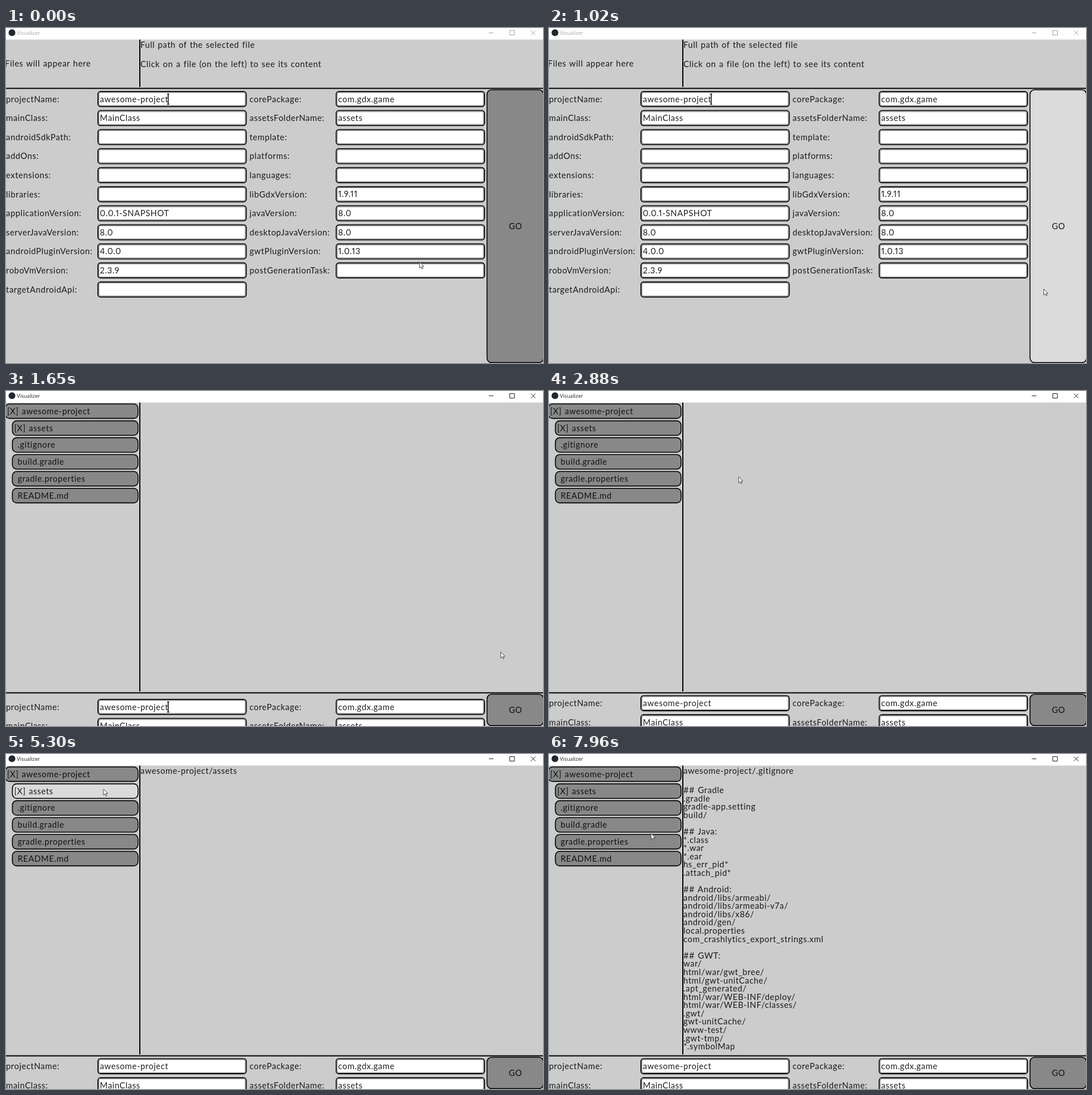
Write an HTML page that moves like this. It is 947x591 px and loops after 8 s.

```html
<!DOCTYPE html>
<html lang="en">
<head>
<meta charset="utf-8">
<title>Visualizer</title>
<style>
  html, body { margin: 0; width: 100%; height: 100%; overflow: hidden; background: #ccc; }
  svg { display: block; width: 947px; height: 591px; }
  text { font: 14.7px Lato, sans-serif; font-variant-numeric: proportional-nums; letter-spacing: .62px; word-spacing: 1px; fill: #000; fill-opacity: .88; white-space: pre; }
  #caption { font: 9.2px "Open Sans", sans-serif; letter-spacing: 0; word-spacing: 0; }
  .button { stroke: #000; stroke-width: 1.6; }
  .rule { stroke: #000; stroke-width: 2; }
</style>
</head>
<body>
<svg id="stage" viewBox="0 0 947 591"></svg>
<script>
const LOOP = 8000;
const ROW = 33.6;
const COLORS = { idle: '#888', over: '#dbdbdb', down: '#383838' };

const FIELDS = [
  ['projectName', 'awesome-project', 'corePackage', 'com.gdx.game'],
  ['mainClass', 'MainClass', 'assetsFolderName', 'assets'],
  ['androidSdkPath', '', 'template', ''],
  ['addOns', '', 'platforms', ''],
  ['extensions', '', 'languages', ''],
  ['libraries', '', 'libGdxVersion', '1.9.11'],
  ['applicationVersion', '0.0.1-SNAPSHOT', 'javaVersion', '8.0'],
  ['serverJavaVersion', '8.0', 'desktopJavaVersion', '8.0'],
  ['androidPluginVersion', '4.0.0', 'gwtPluginVersion', '1.0.13'],
  ['roboVmVersion', '2.3.9', 'postGenerationTask', ''],
  ['targetAndroidApi', '']
];

const TREE = ['[X] awesome-project', '[X] assets', '.gitignore', 'build.gradle', 'gradle.properties', 'README.md'];

const IGNORED = `## Gradle
.gradle
gradle-app.setting
build/

## Java:
*.class
*.war
*.ear
hs_err_pid*
.attach_pid*

## Android:
android/libs/armeabi/
android/libs/armeabi-v7a/
android/libs/x86/
android/gen/
local.properties
com_crashlytics_export_strings.xml

## GWT:
war/
html/war/gwt_bree/
html/gwt-unitCache/
.apt_generated/
html/war/WEB-INF/deploy/
html/war/WEB-INF/classes/
.gwt/
gwt-unitCache/
www-test/
.gwt-tmp/
*.symbolMap`.split('\n');

// pointer moves: first step, last step, number of steps, destination
const START = [729.5, 413];
const MOVES = [
  [80, 790, 10, 872.5, 460.5],
  [1980, 2650, 10, 438, 167],
  [2880, 2880, 1, 334.5, 151.5],
  [2960, 3350, 6, 171, 62],
  [3820, 3910, 2, 170, 48],
  [4670, 4840, 3, 172, 62],
  [5770, 6390, 8, 175, 88],
  [7080, 7570, 7, 180, 140]
];

// clicks: press, full highlight, release
const CLICKS = [
  [1340, 1430, 1650],
  [4140, 4200, 4370],
  [5070, 5160, 5300],
  [6460, 6540, 6770],
  [7720, 7800, 7960]
];

const PATHS = [
  [4370, 'awesome-project'],
  [5300, 'awesome-project/assets'],
  [6770, 'awesome-project/.gitignore']
];

const stage = document.getElementById('stage');

function add(parent, tag, attrs = {}, text) {
  const node = document.createElementNS('http://www.w3.org/2000/svg', tag);
  set(node, attrs);
  if (text !== undefined) node.textContent = text;
  parent.appendChild(node);
  return node;
}

function set(node, attrs) {
  for (const key in attrs) node.setAttribute(key, attrs[key]);
}

const group = (parent = stage) => add(parent, 'g');
const label = (parent, x, y, text) => add(parent, 'text', { x, y }, text);
const show = (node, on) => node.setAttribute('visibility', on ? 'visible' : 'hidden');

function field(parent, x, mid, text) {
  add(parent, 'rect', { x: x + .9, y: mid - 13.2, width: 261.4, height: 26.4, rx: 4.5, fill: '#fff', stroke: '#000', 'stroke-width': 1.8 });
  add(parent, 'rect', { x: x + 2.6, y: mid - 11.5, width: 258, height: 23, rx: 2.5, fill: 'none', stroke: '#999', 'stroke-width': 1.6 });
  label(parent, x + 4.3, mid + 5.2, text);
}

// form
const form = group();
FIELDS.forEach(([left, leftValue, right, rightValue], i) => {
  const mid = i * ROW;
  label(form, 0, mid + 5.4, left + ':');
  field(form, 161.3, mid, leftValue);
  if (!right) return;
  label(form, 429.5, mid + 5.4, right + ':');
  field(form, 581.5, mid, rightValue);
});
const caret = add(form, 'path', { d: 'M286 -9V9.5M284.3 -8.8H287.7M284.3 9.3H287.7', stroke: '#000', 'stroke-width': 1.5 });

const go = { x: 848.3, w: 99.5, node: add(stage, 'rect', { class: 'button', x: 848.3, width: 99.5, rx: 8 }) };
const goText = add(stage, 'text', { x: 898.5, 'text-anchor': 'middle' }, 'GO');

// panels
const vertical = add(stage, 'line', { class: 'rule', x1: 236, x2: 236, y1: 20 });
const horizontal = add(stage, 'line', { class: 'rule', x1: 0, x2: 947 });

const hints = group();
label(hints, -2, 68, 'Files will appear here');
label(hints, 237, 35.2, 'Full path of the selected file');
label(hints, 237, 69.2, 'Click on a file (on the left) to see its content');

const tree = group();
const items = TREE.map((text, i) => {
  const x = i ? 11.3 : -1.2;
  const y = 22.8 + i * 29.8;
  const w = 232.8 - x;
  const node = add(tree, 'rect', { class: 'button', x, y, width: w, height: 25.6, rx: 7.5 });
  label(tree, i === 0 ? 2 : i === 1 ? 14.5 : 20.5, y + 18, text);
  return { x, y, w, h: 25.6, node };
});

const path = label(stage, 237, 35.2, '');
const content = group();
IGNORED.forEach((line, i) => label(content, 237, 69.2 + i * 14.58, line));

// title bar
add(stage, 'rect', { width: 947, height: 20.4, fill: '#fff' });
add(stage, 'circle', { cx: 10.5, cy: 8.3, r: 6, fill: '#23272e' });
const caption = add(stage, 'text', { id: 'caption', x: 19.3, y: 11.8 }, 'Visualizer');
const controls = add(stage, 'path', { d: 'M851.5 8.5H859.5M888.5 4.5H896.5V12.5H888.5ZM925.8 4.5L933.8 12.5M933.8 4.5L925.8 12.5', fill: 'none' });

// pointer
const pointer = group();
const halo = add(pointer, 'circle', { r: 9.6, fill: '#bdb51c' });
add(pointer, 'path', { d: 'M0 0V10.6L2.5 8.3L4.2 12.1L5.9 11.3L4.2 7.6H7.5Z', fill: '#fff', stroke: '#222', 'stroke-width': .8 });

function locate(t) {
  let [x, y] = START;
  for (const [from, to, steps, toX, toY] of MOVES) {
    if (t < from) break;
    const gap = (to - from) / Math.max(1, steps - 1) || 1;
    const p = Math.min(1, (Math.floor((t - from) / gap + 1e-6) + 1) / steps);
    const ease = p * p * (3 - 2 * p);
    x += (toX - x) * ease;
    y += (toY - y) * ease;
  }
  return [x, y];
}

function paint(button, x, y, pressed) {
  const inside = x >= button.x && x <= button.x + button.w && y >= button.y && y <= button.y + button.h;
  button.node.setAttribute('fill', COLORS[inside ? (pressed ? 'down' : 'over') : 'idle']);
}

function draw(t) {
  const active = t >= 1340;
  const built = t >= 1650;
  const [x, y] = locate(t);
  const click = CLICKS.find(c => t >= c[0] && t < c[2]);

  caption.style.fill = active ? '#000' : '#999';
  set(controls, { stroke: active ? '#000' : '#999', 'stroke-width': .9 });

  const split = built ? 532.4 : 106.4;
  vertical.setAttribute('y2', split - 2.4);
  set(horizontal, { y1: split, y2: split });
  form.setAttribute('transform', `translate(0 ${built ? (t < 1720 ? 557.3 : 550.8) : 125.3})`);
  show(caret, Math.floor((t - 1010) / 317) % 2 === 0);

  go.y = split + 2.6;
  go.h = 590.3 - go.y;
  set(go.node, { y: go.y, height: go.h });
  goText.setAttribute('y', go.y + go.h / 2 + 5.6);
  paint(go, x, y, click);
  items.forEach(item => paint(item, x, y, click));

  show(hints, !built);
  show(tree, built);
  const opened = PATHS.filter(p => t >= p[0]).pop();
  path.textContent = opened ? opened[1] : '';
  show(content, t >= 6770);

  pointer.setAttribute('transform', `translate(${x} ${y})`);
  halo.setAttribute('opacity', click ? (t < click[1] ? .5 : .95) : 0);
}

const begin = performance.now();
function tick() {
  draw((performance.now() - begin) % LOOP);
  requestAnimationFrame(tick);
}
draw(0);
requestAnimationFrame(tick);
</script>
</body>
</html>
```
